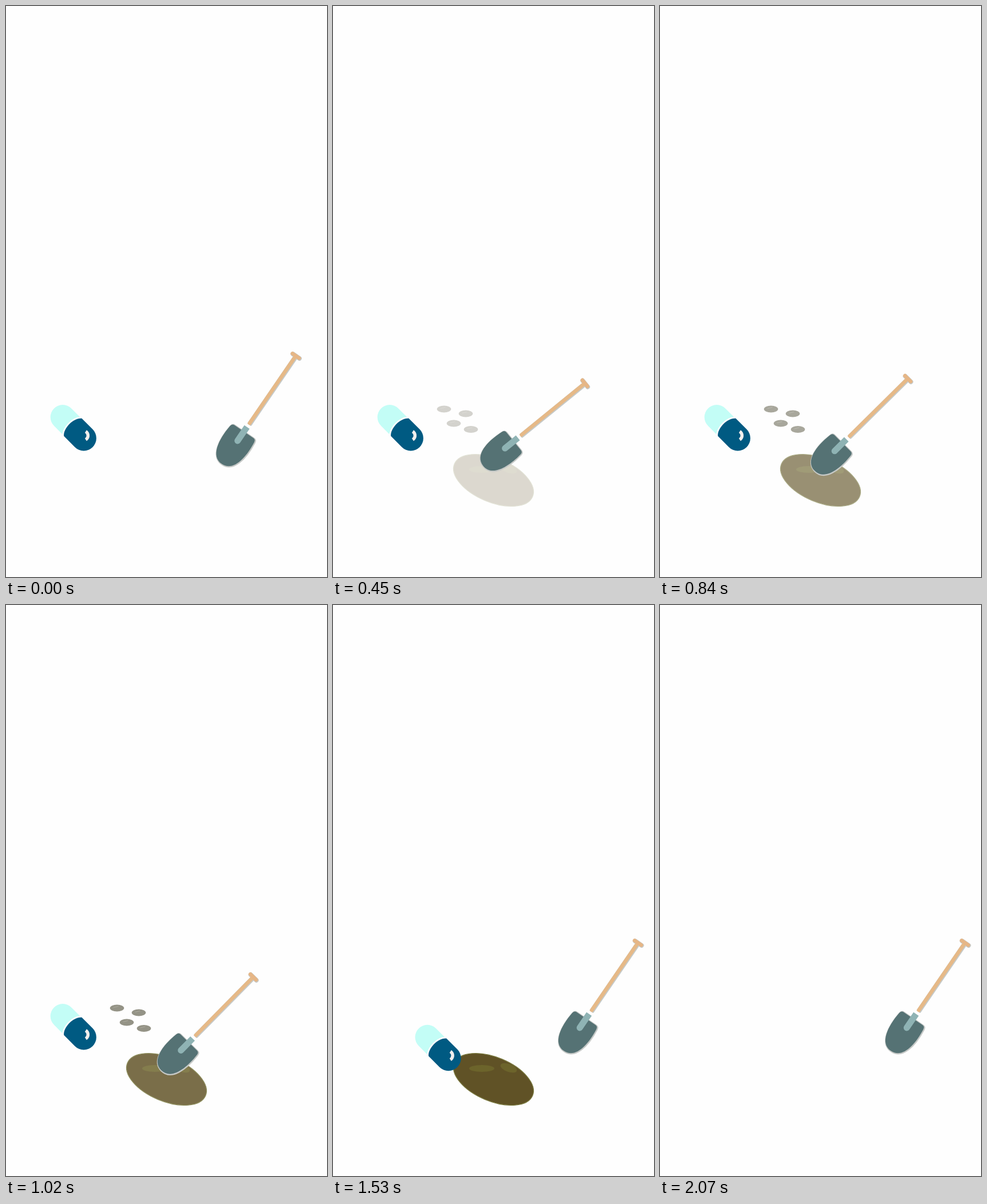
Recreate the animation shown at these times as an HTML page with a canvas. Size 561 px wide and 998 px high, loop 2370 ms.

```html
<!DOCTYPE html>
<html>
<head>
<meta charset="utf-8">
<title>Burying a capsule</title>
<style>
html, body { margin: 0; width: 100%; height: 100%; overflow: hidden; background: #fefefe; }
canvas { display: block; }
</style>
</head>
<body>
<canvas id="stage" width="561" height="998"></canvas>
<script>
const ctx = document.getElementById('stage').getContext('2d');
const LOOP = 2370, STEP = 30, LAST = 2070;
const ARRIVE = 249, ROCK = 342, LEAVE = ARRIVE + 3 * ROCK;
const DEG = Math.PI / 180;

// 0 before a, 1 after b, linear between.
const ramp = (t, a, b) => Math.min(1, Math.max(0, (t - a) / (b - a)));
const mix = (a, b, k) => a + (b - a) * k;

// Color faded towards the page, so that overlaps stay flat.
const fadeColor = (rgb, k) => `rgb(${rgb.map(c => Math.round(mix(254, c, k)))})`;

// Draws in a moved and turned frame.
function within(x, y, turn, paint) {
  ctx.save();
  ctx.translate(x, y);
  ctx.rotate(turn * DEG);
  paint();
  ctx.restore();
}

function fill(path, color) {
  ctx.fillStyle = color;
  ctx.fill(path);
}

function stroke(path, color, width, cap = 'round') {
  ctx.strokeStyle = color;
  ctx.lineWidth = width;
  ctx.lineCap = cap;
  ctx.stroke(path);
}

function oval(rx, ry) {
  const path = new Path2D();
  path.ellipse(0, 0, rx, ry, 0, 0, 2 * Math.PI);
  return path;
}

// One end of the capsule: a round tip and an inner edge bulging by `bulge`.
function half(side, tip, edge, bulge, r) {
  const path = new Path2D();
  path.arc(tip, 0, r, -90 * DEG, 90 * DEG, side < 0);
  path.lineTo(edge, r);
  path.bezierCurveTo(edge - bulge, r * 0.6, edge - bulge, -r * 0.6, edge, -r);
  path.closePath();
  return path;
}

const light = half(-1, -26, -5, 9, 21.5);
const dark = half(1, 26, -1, 11, 22);
const shine = new Path2D();
shine.arc(22, -2.5, 8.5, -103 * DEG, 13 * DEG);

const blade = new Path2D('M-20 48.5H20Q25 48.5 25.5 54C29 85 24 117 0 117S-29 85 -25.5 54Q-25 48.5 -20 48.5Z');
const socket = new Path2D('M-5.5 39H5.5V68A5.5 5.5 0 0 1 -5.5 68Z');
const handle = new Path2D('M0 31V-107');
const grip = new Path2D('M-7 -112H7');
const gap = new Path2D('M-7 36H7');

function drawHole(k) {
  if (k <= 0) return;
  const shine = fadeColor([108, 100, 43], k);
  within(280.5, 829, 22.6, () => {
    const pit = oval(74, 38.3);
    fill(pit, fadeColor([96, 82, 38], k));
    stroke(pit, fadeColor([122, 122, 62], k), 1.3);
  });
  within(260, 810, 0, () => fill(oval(22, 6), shine));
  within(307, 809, 20, () => fill(oval(15, 7), shine));
}

function drawStones(k) {
  const color = fadeColor([132, 130, 115], k), glint = fadeColor([160, 158, 144], k);
  if (k > 0) for (const [x, y] of [[194, 704.5], [232, 712.5], [211, 729.5], [241, 740]]) {
    within(x, y, 0, () => {
      fill(oval(12.3, 6.1), color);
      stroke(new Path2D('M-6 -1L2 -3'), glint, 1);
    });
  }
}

function drawPill(go, alpha) {
  ctx.globalAlpha = alpha;
  within(117.5 + 163 * go, 737 + 91 * go, 45, () => {
    fill(light, '#c3fdf6');
    fill(dark, '#005a82');
    stroke(shine, '#f2efed', 5.5, 'butt');
  });
  ctx.globalAlpha = 1;
}

function drawShovel(x, y, tilt) {
  within(x, y, 34.4 + tilt, () => {
    ctx.translate(1.4, 0);
    const rim = '#c6c9c7';
    ctx.save();
    ctx.translate(0.9, 0.2);
    stroke(blade, rim, 3);
    stroke(handle, rim, 8.5);
    stroke(grip, rim, 8);
    ctx.restore();
    fill(blade, '#557274');
    stroke(handle, '#e6b987', 6.4);
    stroke(grip, '#e6b686', 6.4);
    stroke(gap, '#fefefe', 4.5);
    fill(socket, '#8fb3b4');
  });
}

function draw(t) {
  ctx.fillStyle = '#fefefe';
  ctx.fillRect(0, 0, 561, 998);

  const stay = 1 - ramp(t, 1790, 2060);
  drawHole(ramp(t, ARRIVE, 1170) * stay);
  drawStones(ramp(t, 60, 1170) * (1 - ramp(t, LEAVE, 1500)));
  drawPill(ramp(t, 1345, 1803), stay);

  const come = ramp(t, 0, ARRIVE), leave = ramp(t, LEAVE, LEAVE + ARRIVE);
  const digging = t > ARRIVE && t < LEAVE;
  const phase = (t - ARRIVE) % ROCK / ROCK;
  const tilt = digging ? 20 * (1 - Math.abs(2 * phase - 1)) : 0;
  drawShovel(442 - 89.5 * come + 116 * leave, 703 + 26 * come - 47 * leave, tilt);
}

const start = performance.now();
function tick() {
  const t = (performance.now() - start) % LOOP;
  draw(Math.min(LAST, Math.floor(t / STEP) * STEP));
  requestAnimationFrame(tick);
}
tick();
</script>
</body>
</html>
```
